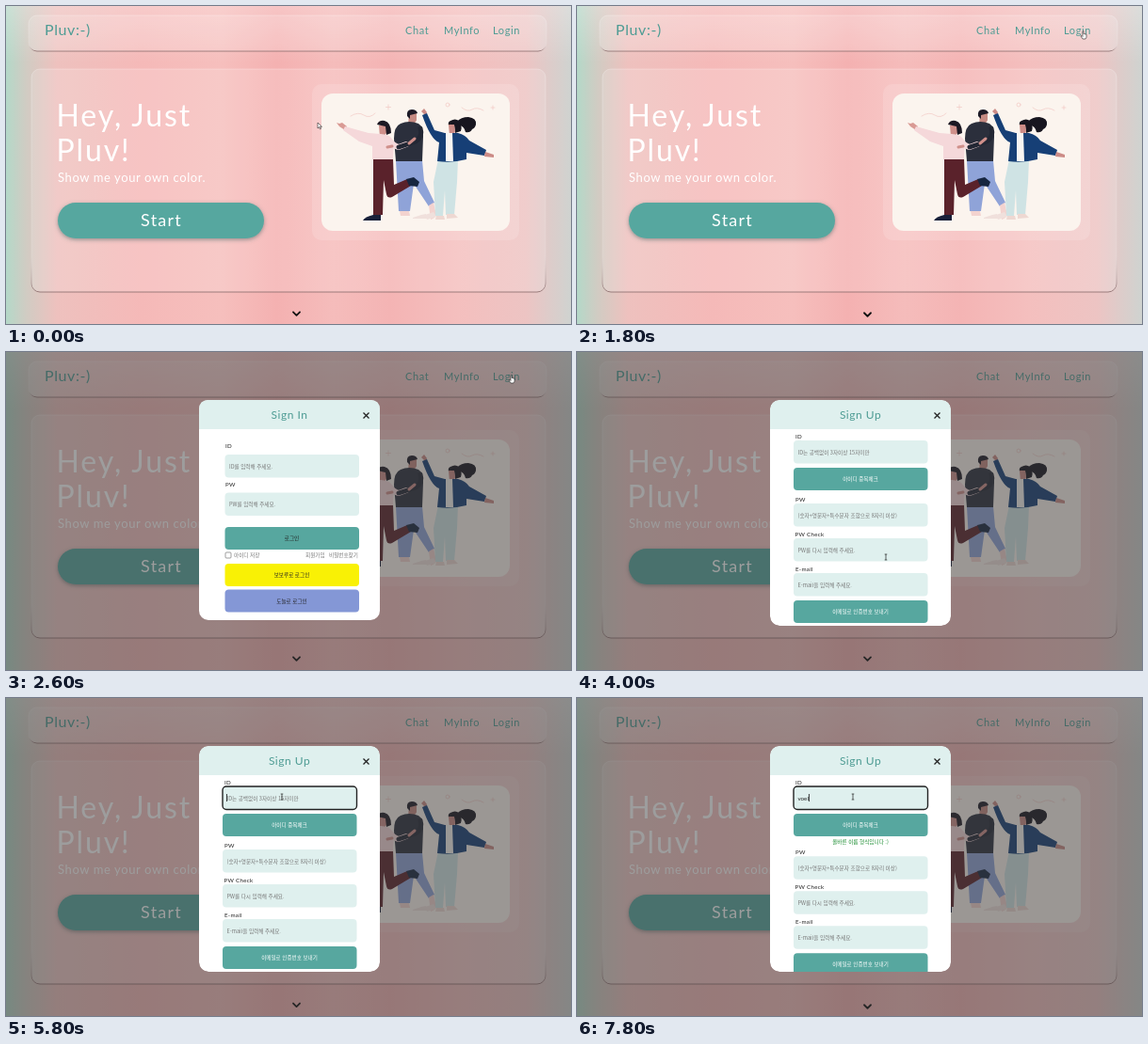
An HTML page that plays this animation: 600x338 px, repeating every 8 s.

```html
<!DOCTYPE html>
<html lang="ko">
<head>
<meta charset="utf-8">
<style>
  html, body { margin: 0; width: 100%; height: 100%; overflow: hidden; }
  svg { display: block; width: 100vw; height: 100vh; }
  text { font-family: Lato, "Noto Sans CJK KR", "Noto Sans CJK", sans-serif; white-space: pre; }
  .ko { font-family: "Noto Sans CJK KR", "Noto Sans CJK", sans-serif; font-size: 5.6px; }
  .mid { text-anchor: middle; }
  .label { font-size: 6.2px; letter-spacing: .3px; fill: #222; }
  .teal { fill: #4e9c94; }
  .panel { fill: #fff; fill-opacity: .15; stroke: url(#edge); }
  .line { fill: none; stroke-linecap: round; stroke-linejoin: round; }
</style>
</head>
<body>
<svg viewBox="0 0 600 338" preserveAspectRatio="none">
  <defs>
    <linearGradient id="bands">
      <stop offset="0" stop-color="#b4d8c8"/><stop offset=".035" stop-color="#d0ccc3"/>
      <stop offset=".09" stop-color="#eec1be"/><stop offset=".24" stop-color="#f5b9b8"/>
      <stop offset=".38" stop-color="#f6bfbd"/><stop offset=".48" stop-color="#f4b1b1"/>
      <stop offset=".58" stop-color="#f5bcbb"/><stop offset=".68" stop-color="#f4b4b4"/>
      <stop offset=".8" stop-color="#f4bfbe"/><stop offset=".92" stop-color="#edc4c3"/>
      <stop offset="1" stop-color="#cfd3d0"/>
    </linearGradient>
    <linearGradient id="top" x2="0" y2="1">
      <stop offset="0" stop-color="#fff" stop-opacity=".25"/><stop offset=".18" stop-color="#fff" stop-opacity="0"/>
    </linearGradient>
    <linearGradient id="edge" x2="0" y2="1">
      <stop offset="0" stop-color="#fff" stop-opacity=".25"/><stop offset=".8" stop-color="#fff" stop-opacity=".1"/>
      <stop offset="1" stop-color="#8a6c6c" stop-opacity=".85"/>
    </linearGradient>
    <filter id="lift" x="-5%" y="-20%" width="110%" height="160%">
      <feDropShadow dx="0" dy="1.5" stdDeviation="2" flood-color="#355" flood-opacity=".5"/>
    </filter>
    <clipPath id="sheet"><rect x="205" y="51" width="192" height="240" rx="10"/></clipPath>
  </defs>

  <rect width="600" height="338" fill="url(#bands)"/>
  <rect width="600" height="338" fill="url(#top)"/>

  <g id="page">
    <rect class="panel" x="24" y="10" width="550" height="38" rx="9"/>
    <rect class="panel" x="27" y="67" width="546" height="237" rx="9"/>
    <g class="teal" font-size="11" letter-spacing=".6">
      <text x="41" y="31" font-size="16">Pluv:-)</text>
      <text x="424" y="30">Chat</text>
      <text x="465" y="30">MyInfo</text>
      <text x="517" y="30">Login</text>
    </g>
    <g fill="#fff">
      <g font-size="32" letter-spacing="1.9">
        <text x="53.5" y="128">Hey, Just</text>
        <text x="53.5" y="165">Pluv!</text>
      </g>
      <text x="55" y="187" font-size="13" letter-spacing=".6">Show me your own color.</text>
    </g>
    <rect x="55" y="209" width="219" height="38" rx="19" fill="#57a79f" filter="url(#lift)"/>
    <text class="mid" x="165" y="234" font-size="18" letter-spacing="1.2" fill="#fff">Start</text>
    <rect x="325" y="83" width="220" height="166" rx="10" fill="#fff" fill-opacity=".13"/>
    <rect x="335" y="93" width="200" height="146" rx="12" fill="#fbf4ee"/>

    <g class="line" stroke="#f3c9c5" stroke-width=".7">
      <path d="M406 105v5M403.500 107.500h5M517 106v4M515 108h4M366 117q8-5 14-1t12-2M484 108q6 5 11 2t12 1"/>
      <circle cx="469" cy="105" r="2"/>
    </g>

    <!-- middle dancer -->
    <path d="M414 164h28l2 22 11 23-6 4-16-24-4 29h-12z" fill="#8fa3d8"/>
    <path d="M449 212l5-3 3 13q-2 4-6 5zM418 218h10l1 5h-10z" fill="#f3d3cf"/>
    <path d="M432 225l9-3 5-1 1 5h-15zM445 222l9-3 3 5-10 3z" fill="#f0e0dc"/>
    <path d="M428 113h8v8q-1 4-5 4v3h-4z" fill="#c58a82"/>
    <path d="M426 117q-1-7 5-7 5 0 6 4l-8 2v4z" fill="#1d1a26"/>
    <path d="M419 125q9-4 19 0 5 3 5 14l-1 26h-28l-2-24q0-13 7-16z" fill="#2b2f3c"/>
    <!-- left dancer -->
    <path d="M390 162h21l1 28 14-6 4 7-20 12q-5 2-6-3l-3-15-1 37h-10z" fill="#5a222b"/>
    <path d="M425 184l8-2 6 5-2 5-9-1z" fill="#172640"/>
    <path d="M390 222h8v6h-19q2-4 11-6z" fill="#18203a"/>
    <path d="M351 124l3 1 3-1 5 4-2 4-6-4z" fill="#d99a94"/>
    <path d="M396 127h8v8l-3 4h-4z" fill="#d0908b"/>
    <path d="M394 126q2-5 8-4 7 2 7 13l-5 2-1-9z" fill="#1c1823"/>
    <path d="M360 128l25 7 13 1q12 0 14 10l-1 17h-22v-14l-14-5-17-12z" fill="#f5d8da"/>
    <path d="M406 142q6 7 11 8l8-3" class="line" stroke="#f5d8da" stroke-width="6"/>
    <path d="M440 130q3 9-5 14l-18 6" class="line" stroke="#232734" stroke-width="5"/>
    <path d="M410 149l-5 1M428 146l6-5" class="line" stroke="#d0908b" stroke-width="3"/>
    <!-- right dancer -->
    <path d="M459 163h21l-1 24-3 35h-9l-1-26-2 27h-8l-2-36z" fill="#cfe3e4"/>
    <path d="M457 223h8l1 4h-10zM468 221h8l4 4-12 1z" fill="#eed8d2"/>
    <path d="M472 122q5-3 9 0 4 5 2 11l-6 2-1-8h-6q-1-4 2-5z" fill="#17151f"/>
    <path d="M479 123q4-5 12-5 9 1 8 8-1 4-4 5-2 4-7 3-1-6-9-9z" fill="#17151f"/>
    <path d="M470 126h6l1 7-2 5h-4z" fill="#cc8b86"/>
    <path d="M441 112l3-3 3 4-1 4z" fill="#cc8b86"/>
    <path d="M442 116l5-2 8 18 11 3h14q8 2 12 8l18 10-2 6-19-3v7q-15 4-31 2l2-20q-9-3-18-29z" fill="#163f76"/>
    <path d="M467 135h7l1 30h-8z" fill="#f8f5f2"/>
    <path d="M509 155l9 3v3l-10-1z" fill="#cc8b86"/>

    <path id="chevron" class="line" d="M305-2l3.5 3.500L312-2" stroke="#111" stroke-width="1.8"/>
  </g>

  <g id="modal">
    <rect width="600" height="338" fill="#3c3c3c" fill-opacity=".5"/>
    <g id="signIn"></g>
    <g id="signUp" clip-path="url(#sheet)"></g>
  </g>

  <g id="cursor" stroke-width=".6" stroke-linejoin="round">
    <path id="arrow" d="M0-2v6l1.5-1.3 1 2.2 1-.5-1-2.1h2z" fill="#fff" stroke="#222"/>
    <path id="hand" d="M-1-3q1-1 1 0v2.500l3 .7v3l-1 1.800h-3l-2-3 1-.5 1 1z" fill="#fff" stroke="#222"/>
    <path id="beam" d="M-1.300-3h2.600M0-3v6M-1.300 3h2.600" fill="none" stroke="#222" stroke-width=".7"/>
  </g>
</svg>
<script>
const $ = id => document.getElementById(id);
const TEAL = '#57a79f', PALE = '#dff0ee';
const LOOP = 8000, STEP = 200;
const SIGN_IN = 2600, SIGN_UP = 4000, FOCUS = 5800, TYPING = 7200;
const NICKNAME = 'voel';

const box = (x, y, h, fill) => `<rect x="${x}" y="${y}" width="142.5" height="${h}" rx="4" fill="${fill}"/>`;
const ko = (x, y, str, fill = '#222', cls = '') =>
  `<text class="ko ${cls}" x="${x}" y="${y}" fill="${fill}">${str}</text>`;
const label = (x, y, str) => `<text class="label" x="${x}" y="${y}">${str}</text>`;
const field = (x, y, hint) => box(x, y, 24.5, PALE) + ko(x + 4.5, y + 14.5, hint, '#777');
const button = (x, y, str, fill, ink) => box(x, y, 24, fill) + ko(x + 71, y + 14, str, ink, 'mid');
const sheet = (title, h) => `
  <rect x="205" y="51" width="192" height="${h}" rx="10" fill="#fff"/>
  <path d="M205 82V61q0-10 10-10h172q10 0 10 10v21z" fill="${PALE}"/>
  <text class="mid teal" x="301" y="71" font-size="12" letter-spacing=".5">${title}</text>
  <path d="M379.5 64.5l6 6m0-6l-6 6" stroke="#222" stroke-width="1.3"/>`;

$('signIn').innerHTML = sheet('Sign In', 234) +
  label(233, 102, 'ID') + field(232.5, 109, 'ID를 입력해 주세요.') +
  label(233, 143, 'PW') + field(232.5, 149.5, 'PW를 입력해 주세요.') +
  button(232.5, 186, '로그인', TEAL) +
  '<rect x="233" y="213" width="6" height="6" rx="1" fill="#fff" stroke="#777" stroke-width=".7"/>' +
  ko(242, 218, '아이디 저장', '#777') + ko(318, 218, '회원가입', '#777') + ko(343, 218, '비밀번호찾기', '#777') +
  button(232.5, 225, '보보루로 로그인', '#f9f105') +
  button(232.5, 252.5, '도늘로 로그인', '#8497d6');

$('signUp').innerHTML = sheet('Sign Up', 240) +
  label(232, 92, 'ID') + box(230, 94, 24.5, PALE) +
  '<rect id="ring" x="230" y="94" width="142.5" height="24.5" rx="4" fill="none" stroke="#222" stroke-width="1.4"/>' +
  `<g id="hint">${ko(234.5, 108.5, 'ID는 공백없이 3자이상 15자미만', '#777')}</g>` +
  '<text id="typed" x="234.5" y="108.5" font-size="6.2" fill="#222"></text>' +
  '<rect id="caret" y="102" width=".8" height="8" fill="#111"/>' +
  button(230, 123, '아이디 중복체크', TEAL, '#fff') +
  `<g id="valid">${ko(301, 154.5, '올바른 이름 형식입니다 :)', '#168a2c', 'mid')}</g>` +
  '<g id="rest">' +
  label(232, 159, 'PW') + field(230, 161, '(숫자+영문자+특수문자 조합으로 8자리 이상)') +
  label(231.5, 196, 'PW Check') + field(230, 198, 'PW를 다시 입력해 주세요.') +
  label(232, 233, 'E-mail') + field(230, 235, 'E-mail을 입력해 주세요.') +
  button(230, 264, '이메일로 인증번호 보내기', TEAL, '#fff') + '</g>';

// time, x, y
const path = [
  [0, 331, 126], [1000, 333, 125], [1200, 333, 125], [1800, 538, 30], [2600, 537, 28],
  [2900, 537, 28], [3600, 328, 216], [4000, 328, 218], [5000, 328, 218], [5800, 293, 105], [LOOP, 293, 105]
];

function pointerAt(t) {
  const i = path.findIndex(p => p[0] > t);
  const [t0, x0, y0] = path[i - 1], [t1, x1, y1] = path[i];
  const k = (t - t0) / (t1 - t0), e = k * k * (3 - 2 * k);
  return [x0 + (x1 - x0) * e, y0 + (y1 - y0) * e];
}

function pointerKind(t) {
  if (t >= SIGN_UP) return 'beam';
  return (t >= 1700 && t < 2900) || t >= 3600 ? 'hand' : 'arrow';
}

const show = (id, on) => $(id).style.display = on ? '' : 'none';

function draw(t) {
  const focused = t >= FOCUS, typing = t >= TYPING;
  show('modal', t >= SIGN_IN);
  show('signIn', t < SIGN_UP);
  show('signUp', t >= SIGN_UP);
  show('ring', focused);
  show('hint', !typing);
  show('valid', typing);
  show('caret', focused && (typing || (t - FOCUS) % 1000 < 500));

  const typed = $('typed');
  typed.textContent = typing ? NICKNAME.slice(0, 1 + Math.floor((t - TYPING) / STEP)) : '';
  $('caret').setAttribute('x', 234 + (typing ? typed.getComputedTextLength() + .6 : 0));
  $('rest').setAttribute('transform', `translate(0 ${typing ? 7.3 : 0})`);
  $('chevron').setAttribute('transform', `translate(0 ${327.3 + Math.sin(t / 1500 * 2 * Math.PI)})`);

  for (const kind of ['arrow', 'hand', 'beam']) show(kind, kind === pointerKind(t));
  $('cursor').setAttribute('transform', `translate(${pointerAt(t)})`);
}

function tick() {
  const t = performance.now() % LOOP;
  draw(Math.floor(t / STEP) * STEP);
  requestAnimationFrame(tick);
}
tick();
</script>
</body>
</html>
```
